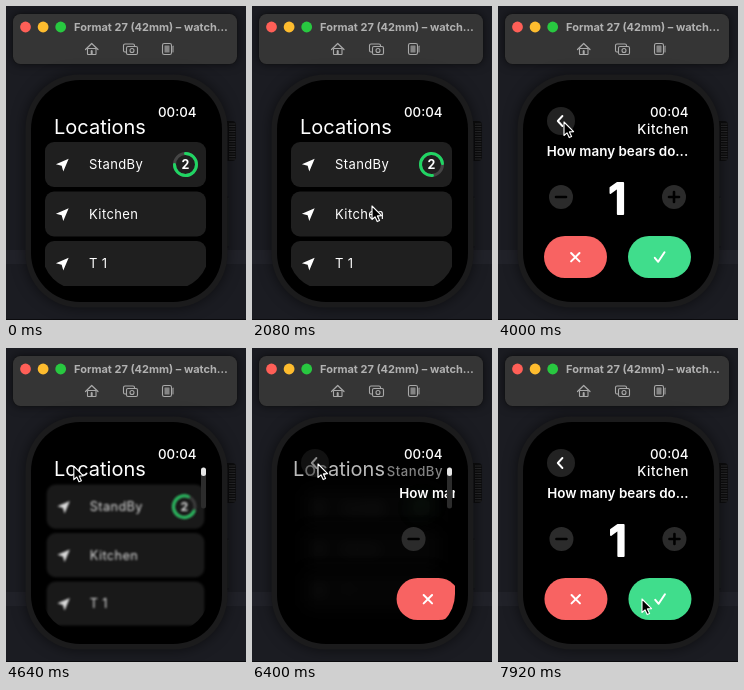
An HTML page with a canvas that plays this animation: 240x314 px, repeating every 8000 ms.

```html
<!DOCTYPE html>
<html lang="en">
<head>
<meta charset="utf-8">
<title>Watch simulator</title>
<style>
html, body { margin: 0; width: 100%; height: 100%; overflow: hidden; background: #1a1b21; }
canvas { display: block; width: 240px; height: 314px; }
</style>
</head>
<body>
<canvas id="stage"></canvas>
<script>
const W = 240, H = 314, LOOP = 8000;
const TRAVEL = 560, REST = 240;   // pointer glide, then pause before a tap
const APPEAR = 1000, START = { x: 126, y: 205 };

const canvas = document.getElementById('stage');
const ctx = canvas.getContext('2d');
const dpr = window.devicePixelRatio || 1;
canvas.width = W * dpr;
canvas.height = H * dpr;

// Where the pointer goes; a tap with "open" pushes or pops the detail page
const stops = [
  { at: 2240, x: 120, y: 200, open: true, name: 'Kitchen' },
  { at: 3640, x: 172, y: 254 },
  { at: 4240, x: 66, y: 116, open: false, name: 'Kitchen' },
  { at: 5360, x: 98, y: 155, open: true, name: 'StandBy' },
  { at: 6240, x: 66, y: 116, open: false, name: 'StandBy' },
  { at: 7200, x: 122, y: 212, open: true, name: 'Kitchen' },
  { at: 8160, x: 144, y: 251 }
];
const taps = stops.filter(s => s.name);

const clamp = v => Math.max(0, Math.min(1, v));
const smooth = k => k * k * (3 - 2 * k);
const spring = t => 1 - (1 + 0.0114 * t) * Math.exp(-0.0114 * t);

function box(x, y, w, h, r, fill) {
  ctx.beginPath();
  ctx.roundRect(x, y, w, h, r);
  if (fill) { ctx.fillStyle = fill; ctx.fill(); }
}

function outline(color, width) {
  ctx.strokeStyle = color;
  ctx.lineWidth = width;
  ctx.stroke();
}

function arc(x, y, r, from = 0, turn = 1) {
  ctx.beginPath();
  ctx.arc(x, y, r, from, from + turn * Math.PI * 2);
}

function disc(x, y, r, fill) {
  arc(x, y, r);
  ctx.fillStyle = fill;
  ctx.fill();
}

function trace(...points) {
  ctx.beginPath();
  points.forEach(([x, y]) => ctx.lineTo(x, y));
}

function bar(x, y, dx, dy, color, width) {
  trace([x - dx, y - dy], [x + dx, y + dy]);
  outline(color, width);
}

function glow(blur, draw) {
  ctx.save();
  ctx.shadowColor = 'rgba(0,0,0,0.55)';
  ctx.shadowBlur = blur * dpr;
  draw();
  ctx.restore();
}

function text(str, x, y, size, { weight = 400, color = '#fff', align = 'left', gap = 0 } = {}) {
  ctx.font = `${weight} ${size}px Inter, Roboto, sans-serif`;
  ctx.letterSpacing = gap + 'px';
  ctx.textAlign = align;
  ctx.fillStyle = color;
  ctx.fillText(str, x, y);
}

function backdrop() {
  ctx.fillStyle = '#1b1c22';
  ctx.fillRect(0, 0, W, H);
  ctx.fillStyle = '#212229';
  ctx.fillRect(0, 244, W, 14);
  ctx.fillStyle = '#0b0b0e';
  ctx.fillRect(0, 313, W, 1);
}

function toolbar() {
  const ink = '#a9a9a9';
  trace([79.5, 43.5], [85.7, 37.5], [92, 43.5]);
  outline(ink, 1.2);
  box(81.5, 42.5, 8.5, 6, 0.5);
  outline(ink, 1.1);
  bar(85.7, 46.5, 0, 1.5, ink, 2);

  box(117.5, 38, 11, 8, 1.5);
  outline(ink, 1.1);
  box(120.5, 40.5, 11, 8, 1.5, '#353535');
  outline(ink, 1.1);
  arc(126, 44.5, 2);
  outline(ink, 1.1);

  box(156.5, 37.5, 9, 11, 1.8);
  outline(ink, 1.1);
  box(158.5, 39.5, 5, 7, 0.5, '#858585');
  bar(167, 43, 0, 3, ink, 1);
}

function titleBar() {
  glow(10, () => box(6.5, 7.5, 225, 51, 8, '#131315'));
  box(7, 8, 224, 50, 7.5, '#353535');
  ['#ff5f57', '#febc2e', '#28c840'].forEach((c, i) => disc(19.5 + i * 17.6, 21, 5.4, c));
  text('Format 27 (42mm) – watch…', 68, 25, 11, { weight: 700, color: '#b1b1b1' });
  toolbar();
}

function watchCase() {
  box(216, 115, 14, 40, 4, '#0d0d0e');
  for (let y = 118; y < 154; y += 2.5) bar(226, y, 3, 0, '#303033', 0.8);
  box(217, 190, 5.5, 52, 2, '#111113');
  bar(222, 216, 0, 24, '#303136', 0.7);
  glow(14, () => box(19.5, 68.5, 202, 233, 54, '#1b1b1c'));
  box(25, 74, 191, 222, 49, '#000');
}

function ring(t) {
  arc(179.5, 158.5, 11);
  outline('#454545', 3);
  arc(179.5, 158.5, 11, -Math.PI / 2 + t / 1400 * Math.PI * 2, 0.75);
  outline('#20d563', 3);
  text('2', 179.5, 163, 12.5, { weight: 700, align: 'center' });
}

function locationArrow(x, y) {
  ctx.save();
  ctx.translate(x, y);
  ctx.rotate(Math.PI / 4);
  trace([0, -8], [5.2, 4.8], [0, 1.9], [-5.2, 4.8]);
  ctx.fillStyle = '#fff';
  ctx.fill();
  ctx.restore();
}

function row(y, label) {
  box(39, y, 161, 45, 9, '#1f1f1f');
  locationArrow(57, y + 22.5);
  text(label, 83, y + 27.3, 13, { gap: 0.4 });
}

// h: 0 shows the list, 1 shows the detail page
function list(t, h) {
  ctx.save();
  ctx.globalAlpha = clamp(1.1 - 1.82 * h * h);
  text('Locations', 48 - 34 * h * h, 127.5, 20);

  ctx.globalAlpha = (1 - h) ** 3;
  const s = 1 - 0.36 * h;
  ctx.translate(119.5, 165);
  ctx.scale(s, s);
  ctx.translate(-119.5, -165);
  if (h > 0.01) ctx.filter = `blur(${(h * 16 * dpr).toFixed(2)}px)`;
  ['StandBy', 'Kitchen', 'T 1'].forEach((name, i) => row(136 + i * 49.5, name));
  ring(t);
  ctx.restore();
}

function stepper() {
  for (const x of [63, 176]) {
    disc(x, 191, 12, '#2b2b2b');
    bar(x, 191, 5, 0, '#000', 2.6);
  }
  bar(176, 191, 0, 5, '#000', 2.6);
  text('1', 119.5, 207.5, 42, { weight: 600, align: 'center' });
  ctx.strokeStyle = '#fff';
  ctx.lineWidth = 1.8;
  ctx.strokeText('1', 119.5, 207.5);
}

function answers() {
  box(46, 230, 63, 42, 21, '#f86362');
  for (const d of [4.2, -4.2]) bar(77.3, 251.2, 4.2, d, '#fff', 2);
  box(130, 230, 63, 42, 21, '#40dd8c');
  trace([156.8, 251.8], [160.2, 255.8], [166.5, 246.3]);
  outline('#fff', 2);
}

function detail(name, h) {
  ctx.save();
  ctx.globalAlpha = clamp((h - 0.15) * 1.7);
  disc(63, 115, 14, '#222');
  trace([64.4, 110], [59.8, 115], [64.4, 120]);
  outline('#fff', 1.9);
  text(name, 191, 128, 13.1, { weight: 450, align: 'right', gap: 0.55 });

  ctx.globalAlpha = 1;
  ctx.translate(180 * (1 - h), 0);
  text('How many bears do...', 48.7, 150.3, 13.45, { weight: 600 });
  stepper();
  answers();
  ctx.restore();
}

function scrollBar(age) {
  ctx.save();
  ctx.globalAlpha = clamp(Math.min(age, 660 - age) / 120);
  box(195, 119.5, 5, 41, 2.5, '#2c2c2c');
  box(195, 119.5, 5, 8.5, 2.5, '#e6e6e6');
  ctx.restore();
}

function pointer(t) {
  if (t < APPEAR) return;
  const i = stops.findIndex(s => s.at - REST + TRAVEL > t && s.at > t);
  const to = stops[i], from = stops[i - 1] || START;
  const e = smooth(clamp((t - to.at + REST) / TRAVEL + 1));
  ctx.save();
  ctx.translate(from.x + (to.x - from.x) * e, from.y + (to.y - from.y) * e);
  trace([0, 0], [0, 13.5], [3, 10.8], [5.2, 15.6], [7.6, 14.5], [5.4, 9.9], [9.6, 9.6]);
  ctx.closePath();
  ctx.fillStyle = '#000';
  ctx.fill();
  outline('#fff', 1.1);
  ctx.restore();
}

function draw(t) {
  ctx.setTransform(dpr, 0, 0, dpr, 0, 0);
  ctx.lineCap = ctx.lineJoin = 'round';
  backdrop();
  titleBar();
  watchCase();

  const tap = taps.filter(s => s.at <= t).pop();
  const age = tap ? t - tap.at : 0;
  const moved = spring(age);
  const h = tap && !tap.open ? 1 - moved : moved;

  ctx.save();
  box(36, 80, 167, 204, 38);
  ctx.clip();
  list(t, h);
  if (tap) detail(tap.name, h);
  scrollBar(age);
  text('00:04', 190.5, 111, 13.3, { weight: 500, align: 'right' });
  ctx.restore();
  pointer(t);
}

function tick() {
  draw(performance.now() % LOOP);
  requestAnimationFrame(tick);
}
tick();
</script>
</body>
</html>
```
